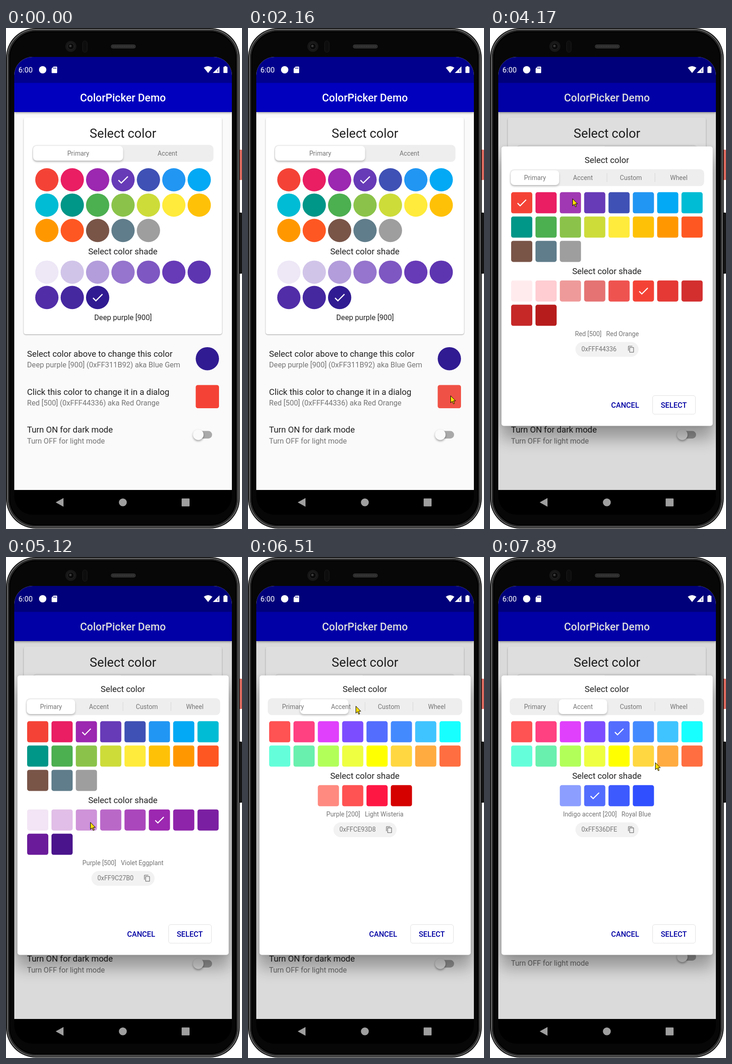
An HTML page that plays this animation: 513 px wide and 1091 px high, repeating every 8000 ms.

```html
<!DOCTYPE html>
<html lang="en">
<head>
<meta charset="utf-8">
<title>ColorPicker Demo</title>
<style>
  html, body { margin: 0; width: 100%; height: 100%; overflow: hidden; background: #fff; }
  svg { display: block; width: 100%; height: 100%; }
  text { font-family: Roboto, "Open Sans", sans-serif; white-space: pre; }
</style>
</head>
<body>
<svg id="stage" viewBox="0 0 513 1091" xmlns="http://www.w3.org/2000/svg"></svg>
<script>
const LOOP = 8000;
const INK = '#212121', GREY = '#757575', BLUE = '#0000a4';

// Material palettes
const hex = s => s.split(' ').map(c => '#' + c);
const PRIMARY = hex('f44336 e91e63 9c27b0 673ab7 3f51b5 2196f3 03a9f4 00bcd4 009688 4caf50 8bc34a cddc39 ffeb3b ffc107 ff9800 ff5722 795548 607d8b 9e9e9e');
const ACCENT = hex('ff5252 ff4081 e040fb 7c4dff 536dfe 448aff 40c4ff 18ffff 64ffda 69f0ae b2ff59 eeff41 ffff00 ffd740 ffab40 ff6e40');
const DEEP_PURPLE = hex('ede7f6 d1c4e9 b39ddb 9575cd 7e57c2 673ab7 5e35b1 512da8 4527a0 311b92');
const RED = hex('ffebee ffcdd2 ef9a9a e57373 ef5350 f44336 e53935 d32f2f c62828 b71c1c');
const PURPLE = hex('f3e5f5 e1bee7 ce93d8 ba68c8 ab47bc 9c27b0 8e24aa 7b1fa2 6a1b9a 4a148c');
const RED_ACCENT = hex('ff8a80 ff5252 ff1744 d50000');
const INDIGO_ACCENT = hex('8c9eff 536dfe 3d5afe 304ffe');

// Drawing helpers
const rect = (x, y, w, h, r, fill, more = '') =>
  `<rect x="${x}" y="${y}" width="${w}" height="${h}" rx="${r}" fill="${fill}" ${more}/>`;
const circle = (x, y, r, fill, more = '') =>
  `<circle cx="${x}" cy="${y}" r="${r}" fill="${fill}" ${more}/>`;
const path = (d, fill, more = '') => `<path d="${d}" fill="${fill}" ${more}/>`;
const text = (x, y, size, str, fill = INK, more = '') =>
  `<text x="${x}" y="${y}" font-size="${size}" fill="${fill}" ${more}>${str}</text>`;
const mid = (x, y, size, str, fill = INK, weight = 400) =>
  text(x, y, size, str, fill, `text-anchor="middle" font-weight="${weight}"`);
const group = (id, body, more = '') => `<g id="${id}" ${more}>${body}</g>`;
const check = (x, y, s) =>
  path('M9 16.17L4.83 12l-1.42 1.41L9 19 21 7l-1.41-1.41z', '#fff',
    `transform="translate(${x} ${y}) scale(${s}) translate(-12 -12)"`);

function dots(colors, top, picked) {
  return colors.map((c, i) => {
    const x = 88.8 + i % 7 * 55.2, y = top + Math.floor(i / 7) * 55.2;
    return circle(x, y, 25.3, c) + (i === picked ? check(x, y, 1.265) : '');
  }).join('');
}

const TILE = 46, PITCH = 52.9, TILE_TOP = 357.6, TILE_MID = 254.1;
function tiles(colors, top, picked) {
  const cols = Math.min(8, colors.length);
  const left = TILE_MID - (cols * PITCH - 6.9) / 2;
  return colors.map((c, i) => {
    const x = left + i % 8 * PITCH, y = top + Math.floor(i / 8) * PITCH;
    return rect(x, y, TILE, TILE, 4.6, c) +
      (i === picked ? check(x + TILE / 2, y + TILE / 2, 1.15) : '');
  }).join('');
}

function phone() {
  return rect(506, 265, 7, 66, 1.5, '#d9695f') + rect(506, 402, 7, 133, 1.5, '#141414') +
    rect(0, 0, 508, 1090, 65, '#0c0c0c') +
    rect(3, 3, 502, 1084, 62, 'none', 'stroke="#6e6e6e" stroke-width="2"') +
    rect(5.5, 5.5, 497, 1079, 60, 'none', 'stroke="#2a2a2a" stroke-width="3"') +
    rect(8, 8, 492, 1074, 58, '#070707', 'stroke="#000" stroke-width="2"') +
    circle(141, 40, 12, '#171717') + circle(141, 40, 7, '#0a0a0a', 'stroke="#2b2b2b"') +
    circle(140, 39, 2.6, '#3a3a3a') +
    rect(166.5, 28, 10, 25, 5, '#0d0d0d', 'stroke="#1a1a1a"') +
    rect(228.5, 36.5, 53, 7.5, 3.7, '#292929', 'stroke="#3b3b3b"') +
    path('M232 40.2H279', 'none', 'stroke="#474747" stroke-width="3" stroke-dasharray="1 1.5"');
}

function tabThumb(x, y, w, h) {
  return rect(x, y + 3, w, h, 8, '#000', 'opacity=".2" filter="url(#soft)"') +
    rect(x, y, w, h, 8, '#fff');
}

function lowerRows() {
  const row = (y, title, sub) => text(45.8, y, 18.4, title) + text(45.8, y + 23.3, 16.1, sub, GREY);
  return row(715.5, 'Select color above to change this color', 'Deep purple [900] (0xFF311B92) aka Blue Gem') +
    row(798.5, 'Click this color to change it in a dialog', 'Red [500] (0xFFF44336) aka Red Orange') +
    row(881.3, 'Turn ON for dark mode', 'Turn OFF for light mode') +
    circle(437.7, 720.2, 25.3, '#311b92') +
    rect(412.4, 777.5, 50.6, 50.6, 4.6, PRIMARY[0]) +
    rect(412.4, 777.5, 50.6, 50.6, 4.6, '#c8c8c8', 'id="squareSplash"') +
    rect(411, 877.5, 37, 16.5, 8.2, '#a9a9a9') +
    circle(418, 888, 11.5, '#000', 'opacity=".35" filter="url(#soft)"') +
    circle(418, 885.7, 11.5, '#fafafa');
}

function page() {
  return rect(18, 63, 473, 943, 0, '#fafafa') +
    rect(18, 121, 473, 64, 0, '#000', 'opacity=".35" filter="url(#soft)"') +
    rect(18, 119, 473, 64, 0, '#0000be') + rect(18, 63, 473, 56.5, 0, '#00008c') +
    mid(254.2, 160, 23, 'ColorPicker Demo', '#fff', 500) +
    rect(38.5, 196.5, 431, 471.5, 4.6, '#000', 'opacity=".38" filter="url(#thin)"') +
    rect(38.5, 195, 431, 472, 4.6, '#fff') +
    mid(254.2, 239, 27.6, 'Select color') +
    rect(57, 254.5, 394, 37, 9, '#eee') + tabThumb(59, 256.8, 195.5, 32) +
    mid(157, 277.7, 13.8, 'Primary', GREY) + mid(351, 277.7, 13.8, 'Accent', GREY) +
    dots(PRIMARY, 330.5, 3) + mid(254, 492.8, 18.4, 'Select color shade') +
    dots(DEEP_PURPLE, 531.7, 9) + mid(254.4, 636.3, 16.1, 'Deep purple [900]') +
    group('lower', lowerRows());
}

function statusIcons() {
  return text(27, 96.8, 16.1, '6:00', '#fff') + circle(79.7, 91, 8, '#fff') +
    path('M103.5 84H110a1.2 1.2 0 0 1 1.2 1.2V97a1.2 1.2 0 0 1-1.2 1.2h-9.6A1.2 1.2 0 0 1 99.2 97V88.3z', '#fff') +
    path('M103.6 86v3M106 86v3M108.4 86v3', 'none', 'stroke="#00008c" stroke-width="1.1"') +
    path('M439.3 98L430 86.5Q439.3 79.5 448.6 86.5z', '#fff') +
    path('M464 83.5V98H449.5z', '#fff') +
    path('M460.5 90.5V96', 'none', 'stroke="#00008c" stroke-width="1"') +
    path('M475 83h4v1.6h1.4q1 0 1 1V97q0 1-1 1h-6.8q-1 0-1-1V85.6q0-1 1-1H475z', '#fff');
}

function navBar() {
  const c = '#9f9f9f';
  return rect(18, 1006, 473, 54, 0, '#000') + path('M108 1033L125 1023.5V1042.5z', c) +
    circle(254, 1033, 8.6, c) + rect(381.8, 1024.5, 17.2, 17.2, 1.2, c);
}

const VIEWS = [
  { at: 2860, colors: PRIMARY, pick: 0, shades: RED, shade: 5, name: 'Red [500]   Red Orange', code: '0xFFF44336' },
  { at: 4400, colors: PRIMARY, pick: 2, shades: PURPLE, shade: 5, name: 'Purple [500]   Violet Eggplant', code: '0xFF9C27B0' },
  { at: 5590, colors: PRIMARY, pick: 2, shades: PURPLE, shade: 2, name: 'Purple [200]   Light Wisteria', code: '0xFFCE93D8' },
  { at: 6430, colors: ACCENT, pick: -1, shades: RED_ACCENT, shade: -1, name: 'Purple [200]   Light Wisteria', code: '0xFFCE93D8' },
  { at: 7580, colors: ACCENT, pick: 4, shades: INDIGO_ACCENT, shade: 1, name: 'Indigo accent [200]   Royal Blue', code: '0xFF536DFE' }
];

function pickerView(v, i) {
  const shadeTop = TILE_TOP + 33.4 + Math.ceil(v.colors.length / 8) * PITCH;
  const end = shadeTop + Math.ceil(v.shades.length / 8) * PITCH;
  return group('view' + i,
    tiles(v.colors, TILE_TOP, v.pick) + mid(254, shadeTop - 13.8, 18.4, 'Select color shade') +
    tiles(v.shades, shadeTop, v.shade) +
    mid(254.2, end + 15, 13.8, v.name, GREY) +
    rect(185.7, end + 28.2, 137.3, 32.2, 16.1, '#f2f2f2') +
    text(198.8, end + 48.2, 13.8, v.code, GREY) +
    path('M16 1H4c-1.1 0-2 .9-2 2v14h2V3h12V1zm3 4H8c-1.1 0-2 .9-2 2v14c0 1.1.9 2 2 2h11c1.1 0 2-.9 2-2V7c0-1.1-.9-2-2-2zm0 16H8V7h11v14z',
      GREY, `transform="translate(${306.5 - 7.6} ${end + 44 - 7.9}) scale(.66)"`));
}

function dialog() {
  const divider = (x, id) => rect(x, 316, 1, 19, 0, '#d6d6d6', `id="${id}"`);
  return rect(23, 285, 463, 610, 6, '#000', 'opacity=".3" filter="url(#wide)"') +
    rect(25, 259, 459, 609, 5, '#000', 'opacity=".1" filter="url(#near)"') +
    rect(25, 258, 459, 608.5, 5, '#fff') +
    mid(254, 293.8, 18.4, 'Select color') +
    rect(43, 307.5, 422.5, 36.8, 9, '#eee') + divider(253.8, 'divA') + divider(358, 'divB') +
    group('thumb', tabThumb(45, 310, 105.3, 32)) +
    ['Primary', 'Accent', 'Custom', 'Wheel'].map((s, i) => mid(97.8 + i * 104.2, 330.5, 13.8, s, GREY)).join('') +
    VIEWS.map(pickerView).join('') +
    mid(293.7, 826.7, 16.1, 'CANCEL', BLUE, 500) +
    rect(353.5, 800.5, 93, 40.5, 4.6, '#fff', 'stroke="#e0e0e0"') +
    mid(399.5, 826.7, 16.1, 'SELECT', BLUE, 500) +
    rect(0, 0, TILE, TILE, 4.6, '#c8c8c8', 'id="tileSplash" opacity=".1"');
}

const blur = (id, sd) =>
  `<filter id="${id}" x="-50%" y="-50%" width="200%" height="200%"><feGaussianBlur stdDeviation="${sd}"/></filter>`;

document.getElementById('stage').innerHTML =
  `<defs>${blur('thin', 1)}${blur('soft', 2.2)}${blur('near', 5)}${blur('wide', 17)}` +
  `<clipPath id="screen">${rect(18, 63, 473, 997, 40, '#000')}</clipPath>` +
  `<clipPath id="app">${rect(18, 63, 473, 943, 0, '#000')}</clipPath></defs>` +
  phone() +
  `<g clip-path="url(#screen)">` +
    `<g clip-path="url(#app)">${page()}${rect(18, 63, 473, 943, 0, '#000', 'id="scrim" opacity=".13"')}` +
    `${statusIcons()}${group('dialog', dialog())}</g>${navBar()}</g>` +
  group('pointer',
    circle(0, 0, 11.5, '#ff0', 'id="halo" opacity=".47"') +
    path('M.5 .8V16.2L4.1 12.8 6.6 18.5 8.9 17.5 6.5 11.9H11.3z', '#ffe000', 'stroke="#000"'));

const el = id => document.getElementById(id);
const show = (id, on) => el(id).style.display = on ? '' : 'none';
const within = (t, spans) => spans.some(([a, b]) => t >= a && t < b);

// The screen redraws only at these moments: start, end, steps
const BURSTS = [[0, 0, 1], [1000, 1390, 6], [1850, 1850, 1], [2000, 2160, 3], [2860, 2860, 1],
  [3330, 4100, 11], [4170, 4950, 11], [5040, 5190, 3], [5360, 5360, 1], [5590, 6350, 11],
  [6430, 6970, 8], [7210, 7210, 1], [7350, 7890, 8]];

function snap(t) {
  const [a, b, n] = BURSTS.filter(s => s[0] <= t).pop();
  if (n === 1) return a;
  const step = (b - a) / (n - 1);
  return Math.round(a + Math.min(n - 1, Math.floor((t - a) / step + 1e-6)) * step);
}

// Pointer stops: time, x, y
const STOPS = [[930, 516, 832], [1390, 440, 800], [3260, 440, 800], [4020, 179, 371], [4480, 179, 371],
  [4950, 193, 577], [5115, 183, 577], [5590, 183, 577], [6270, 234, 324], [6510, 234, 324],
  [6970, 275.5, 380.5], [7580, 275.5, 380.5], [7890, 359, 447]];
const CLICKS = [[1850, 2000], [4100, 4170], [5190, 5360], [6350, 6430], [7210, 7350]];
// Pressed tiles: start, end, column, top
const PRESSES = [[4170, 4400, 2, TILE_TOP], [5360, 5590, 2, 549.7], [7350, 7580, 4, TILE_TOP]];

function pointerAt(t) {
  const i = STOPS.findIndex(s => s[0] >= t);
  if (i < 1) return STOPS[i < 0 ? STOPS.length - 1 : 0].slice(1);
  const [t0, x0, y0] = STOPS[i - 1], [t1, x1, y1] = STOPS[i];
  const u = (t - t0) / (t1 - t0), p = u * u * (3 - 2 * u);
  return [x0 + (x1 - x0) * p, y0 + (y1 - y0) * p];
}

function render(time) {
  const t = snap(time);
  const open = t >= 2860;
  show('dialog', open);
  show('scrim', open);
  VIEWS.forEach((v, i) => show('view' + i, t >= v.at && !(i + 1 < VIEWS.length && t >= VIEWS[i + 1].at)));

  const slide = 1 - (1 - Math.min(1, Math.max(0, (t - 6400) / 360))) ** 3;
  el('thumb').setAttribute('transform', `translate(${slide * 104.4} 0)`);
  el('divA').setAttribute('opacity', 1 - slide ** 4);

  el('lower').setAttribute('transform', `translate(0 ${t >= 7580 ? -15 : 0})`);
  el('squareSplash').setAttribute('opacity', within(t, [[2000, 2860]]) ? 0.1 * Math.min(1, (t - 1920) / 240) : 0);
  const press = PRESSES.find(p => within(t, [p]));
  show('tileSplash', press);
  if (press) {
    const x = TILE_MID - 4 * PITCH + 3.45 + press[2] * PITCH;
    el('tileSplash').setAttribute('transform', `translate(${x} ${press[3]})`);
  }

  show('pointer', t >= 1000);
  show('halo', within(t, CLICKS));
  el('pointer').setAttribute('transform', `translate(${pointerAt(t).join(' ')})`);
}

const start = performance.now();
function frame() {
  render((performance.now() - start) % LOOP);
  requestAnimationFrame(frame);
}
frame();
</script>
</body>
</html>
```
